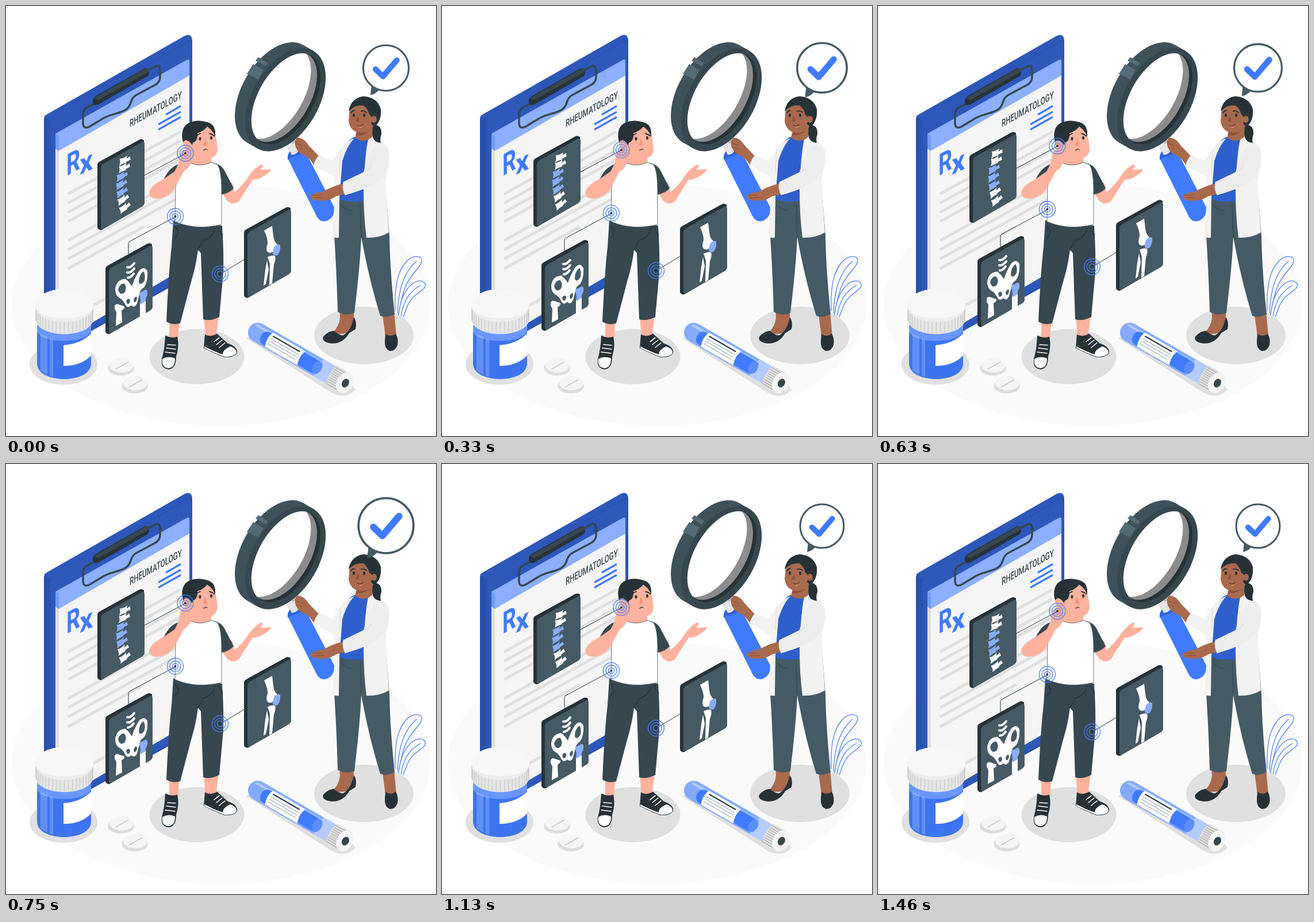
An HTML page for the animation above (1.5 s loop, 748 px wide and 748 px high).

```html
<!DOCTYPE html>
<html lang="en">
<head>
<meta charset="utf-8">
<title>Rheumatology</title>
<style>
html, body { margin: 0; width: 100%; height: 100%; overflow: hidden; background: #fff; }
svg { display: block; width: 100vw; height: 100vh; }
text { font-family: Roboto, "Open Sans", sans-serif; }
.line { fill: none; stroke-linecap: round; stroke-linejoin: round; }
.flat { stroke-linecap: butt; }
.dark { fill: #263238; }
.slate { fill: #37474f; }
.steel { fill: #455a64; }
.blue { fill: #407bff; }
.skin { fill: #ffb29d; }
.tan { fill: #a9694c; }
.coat { fill: #f2f2f2; }
.shade { fill: #e0e0e0; }
</style>
</head>
<body>
<svg viewBox="0 0 748 748">
  <ellipse cx="374" cy="520" rx="364" ry="210" fill="#fafafa"/>
  <g class="shade">
    <ellipse cx="622.5" cy="573" rx="86.5" ry="50"/>
    <ellipse cx="332" cy="610" rx="82.5" ry="48"/>
  </g>

  <g id="plant" class="line" stroke="#407bff" stroke-width="1.2">
    <path fill="#fff" d="M677 530C676 490 680 462 697 444C708 433 723 434 723 442C724 454 705 462 694 490Q687 510 683 537"/>
    <path fill="#fff" d="M683 537C686 510 694 490 712 480C723 475 731 481 729 488C726 496 708 501 699 520L691 541"/>
    <path d="M681 534C683 490 693 462 714 444M687 539C692 512 702 496 721 486"/>
  </g>

  <g id="board">
    <path fill="#2a51ac" d="M66 198Q66 191 72 188L311 52Q324 46 324 62L320 470L77 605L66 595Z"/>
    <path fill="#2d57b9" d="M77 208Q77 200 84 196L311 65Q324 57 324 70V464L77 605Z"/>
    <path fill="#2d57b9" d="M66 192L311 52Q320 48 323 56L77 201Z"/>
    <path fill="#e0e0e0" d="M86 222L92 226V590L86 585Z"/>
    <path fill="#f5f5f5" d="M92 226L319 94V451L92 585Z"/>
    <path fill="#8cb0ff" d="M86 222L314 94Q319 91 319 97V121L92 252L86 248Z"/>
    <path fill="#6f9bff" d="M86 222L92 226V252L86 248Z"/>
    <g id="rules" class="line flat" stroke="#e0e0e0" stroke-width="5"></g>
    <path class="line flat" stroke="#407bff" stroke-width="3.2" d="M278 189L304 174M265 206L304 184M265 215L304 193"/>
    <text transform="matrix(.645 -.36 0 1 215 211)" font-size="18" fill="#37474f" font-weight="500">RHEUMATOLOGY</text>
    <g class="blue" font-weight="700">
      <text transform="matrix(.72 -.4 0 1 105 296)" font-size="52">R</text>
      <text transform="matrix(1.02 -.48 0 1.1 128 294)" font-size="45">x</text>
    </g>
    <path class="line" stroke="#37474f" stroke-width="3.5" d="M152 171L140 177Q134 181 134 188V203Q134 215 145 210L165 198C180 187 195 189 209 180Q215 176 218 165Q221 157 230 153L260 137Q268 132 268 124V111Q267 101 258 106L247 112"/>
    <path class="dark" d="M151 168Q150 160 157 156L242 108Q249 107 249 117Q248 122 243 124L163 170Q154 176 151 168Z"/>
    <path class="slate" d="M153 160L244 108Q249 109 249 114L160 164Z"/>
  </g>

  <g id="bottle">
    <ellipse class="shade" cx="100" cy="623" rx="59" ry="36"/>
    <path fill="#3d74f0" d="M54 555H148V622C148 658 54 658 54 622Z"/>
    <path fill="#6a97ff" d="M54 555H148V566C140 588 62 588 54 566Z"/>
    <path fill="#fff" opacity=".2" d="M60 570L72 576V641L60 634ZM76 578L82 580V645L76 643Z"/>
    <path fill="#fff" d="M100 590Q130 588 148 570V608Q131 626 100 626Z"/>
    <path fill="#e6e6e6" d="M51 520H152V543C151 580 52 580 51 543Z"/>
    <path id="ribs" stroke="#cfcfcf" stroke-width="1.5" fill="none"/>
    <ellipse cx="101.5" cy="520" rx="50.5" ry="28" fill="#f7f7f7"/>
    <path fill="#ededed" d="M54 528Q60 548 101 550Q143 548 149 528Q138 543 101 543Q66 543 54 528Z"/>
  </g>

  <g id="pills"></g>

  <g id="tube">
    <path class="shade" d="M418 578L565 672Q590 686 608 668L590 640L440 568Z"/>
    <g transform="translate(438 568) rotate(30)">
      <rect x="-17" y="-17" width="176" height="34" rx="17" fill="#85abff"/>
      <path fill="#b4ccff" d="M122 -17H150V17H122Z"/>
      <path fill="#b4ccff" d="M-8 -12H140V-8H-10Z"/>
      <rect x="8" y="-11" width="118" height="25" rx="11" fill="#407bff"/>
      <ellipse cx="120" cy="1" rx="8" ry="12" fill="#5b8dff"/>
      <path fill="#fff" d="M23 -13H88Q82 0 88 15H23Q17 0 23 -13Z"/>
      <path fill="#37474f" d="M26 -9H80V-6.500H26Z"/>
      <path class="line" stroke="#9eabb2" stroke-width="1.2" d="M25 -2H80M25 3H80M25 8H80"/>
      <path fill="#dedede" d="M148 -19H176V19H148Q141 0 148 -19Z"/>
      <path id="grooves" stroke="#aaa" stroke-width="1" fill="none"/>
      <ellipse cx="175" cy="0" rx="14" ry="19" fill="#f5f5f5"/>
      <ellipse class="slate" cx="176" cy="0" rx="6" ry="8"/>
    </g>
  </g>

  <g id="man">
    <path class="skin" d="M284 542H302L299 580H284ZM344 538H370L365 577H347Z"/>
    <path class="dark" d="M277 573Q288 579 298 575Q302 592 296 610Q296 631 283 632Q269 631 271 614Q276 598 277 573Z"/>
    <path fill="#fff" d="M272 614Q282 608 294 613Q294 629 283 630Q270 629 272 614Z"/>
    <path class="dark" d="M346 571Q355 577 367 570L386 587Q404 593 402 604Q397 612 380 611Q366 606 344 595Z"/>
    <path fill="#fff" d="M345 592Q366 603 377 606Q377 598 390 592Q402 596 401 604Q396 611 380 610Q366 605 345 595Z"/>
    <path class="line" stroke="#fff" stroke-width="1.6" d="M281 589L295 590M279 595L295 597M277 602L294 604M362 584L371 577M366 589L376 581M371 594L381 586"/>
    <path class="slate" d="M291 373L376 382Q379 426 378 464L371 541Q355 549 343 545L339 430L334 424Q331 450 322 480L303 552Q290 556 279 549Q283 460 288 420Z"/>
    <path class="line" stroke="#263238" stroke-width="1.2" d="M364 386Q360 404 341 408M334 424L342 410M294 383Q306 396 292 404M377 398Q370 392 370 384"/>

    <path class="skin" d="M371 302L394 308L397 324Q412 312 421 298Q428 286 441 277Q449 274 446 280L442 285L462 284Q456 292 448 296Q438 303 429 302L405 340Q396 347 386 340Q375 328 371 302Z"/>
    <path class="line" stroke="#eb9481" stroke-width="1" d="M442 285L436 289M448 291L457 286"/>
    <path class="slate" d="M354 273Q372 272 380 286L396 317Q388 326 375 328Z"/>
    <path class="skin" d="M322 248L356 255L358 276Q336 286 320 276Z"/>
    <path class="slate" d="M308 273Q286 276 274 302Q282 308 297 309L310 282Z"/>
    <path fill="#fff" stroke="#455a64" stroke-width=".8" d="M321 273Q338 281 357 272L368 276Q375 287 375 320V380Q331 391 294 375L295 315Q300 289 310 278Z"/>

    <path class="skin" d="M322 212Q329 206 361 213Q367 231 368 250Q366 268 345 264Q326 260 319 247Z"/>
    <path class="dark" d="M307 233Q303 209 321 202Q334 197 350 202Q362 205 364 218V227Q359 215 350 210Q342 219 333 221Q334 235 325 238L322 249Q311 248 307 233Z"/>
    <path class="skin" d="M321 238Q312 229 308 238Q308 249 320 253L326 245Z"/>
    <path class="skin" d="M274 301Q252 312 249 324Q249 336 264 335Q285 334 296 312L309 288Q322 280 323 266Q325 254 320 249Q309 246 303 257Q302 274 293 288Z"/>
    <path fill="#f28f7c" d="M346 231L350 242L343 243Z"/>
    <g class="dark"><ellipse cx="337.5" cy="231" rx="2" ry="3"/><ellipse cx="357" cy="229.500" rx="2" ry="3"/></g>
    <path class="line" stroke="#263238" stroke-width="1.8" d="M331 226Q334 223 338 222M354 222Q359 223 362 226"/>
    <path class="line" stroke="#263238" stroke-width="1.3" d="M344 251Q347 248 350 250"/>
  </g>

  <g id="lens">
    <path class="line flat" stroke="#bdbdbd" stroke-width="18" d="M495 236L508 262"/>
    <path class="line flat" stroke="#e6e6e6" stroke-width="10" d="M492 238L505 264"/>
    <path class="blue" d="M490 265Q490 251 505 247Q515 244 520 252L571 350Q573 366 560 373Q548 378 541 367Z"/>
    <path fill="#3063d4" d="M490 265Q490 251 505 247Q515 244 519 250Q515 260 502 262Q493 263 490 268Z"/>
    <path fill="#e6e6e6" d="M490 244L504 237L510 250Q507 258 497 259Z"/>
    <g transform="rotate(30 486 163)" fill="#3f515a">
      <ellipse cx="465.5" cy="163" rx="58" ry="98"/>
      <rect x="465.500" y="65" width="20.500" height="196"/>
    </g>
    <path fill="#546a74" d="M419 118L439 128L448 111L430 101ZM434 95L452 105L456 99L439 89Z"/>
    <g transform="rotate(30 486 163)">
      <ellipse cx="486" cy="163" rx="58" ry="98" class="slate"/>
      <clipPath id="hole"><ellipse cx="486" cy="161" rx="48" ry="87"/></clipPath>
      <g clip-path="url(#hole)">
        <rect x="420" y="60" width="140" height="210" class="dark"/>
        <ellipse cx="480" cy="161" rx="47" ry="86" fill="#8c8c8c"/>
        <ellipse cx="468" cy="161" rx="46" ry="87" fill="#fff"/>
      </g>
    </g>
  </g>

  <g id="doctor">
    <path class="tan" d="M580 525H606L603 563Q590 574 568 569Q580 556 581 542ZM654 530H675L679 574Q669 582 660 574Z"/>
    <path class="dark" d="M552 575Q560 566 570 565Q578 572 586 573Q600 566 605 541Q611 549 608 562L597 569Q586 588 566 587Q548 584 552 575ZM660 570Q668 577 678 570Q683 579 681 590Q677 601 667 600Q658 596 659 582Z"/>
    <path class="steel" d="M580 334H662L667 400Q668 460 676 536Q663 543 651 539C636 490 626 445 618 402C616 450 610 500 606 534Q592 540 577 532Q575 460 571 400Z"/>
    <path class="line" stroke="#37474f" stroke-width="1.2" d="M618 402L616 346M584 346Q586 353 602 356"/>
    <path fill="#2f5fcc" d="M605 228L634 228L626 338Q604 344 579 336L583 253Q591 236 605 228Z"/>
    <path class="tan" d="M537 279Q527 262 517 259Q508 255 504 246Q500 234 507 229Q518 229 527 243L546 263Z"/>
    <path class="line" stroke="#8c503a" stroke-width="1" d="M505 238L516 243M505 245L515 248"/>
    <path class="coat" d="M606 230Q589 236 582 249L568 269L545 259Q538 266 535 277L571 298Q573 350 567 401Q572 404 579 403L580 334L585 270Q593 243 606 230Z"/>
    <path class="coat" d="M636 226Q663 234 667 254Q668 276 660 297L666 394Q649 404 627 403Q622 364 622 320Q624 260 630 232Z"/>
    <path class="line" stroke="#dadada" stroke-width="1" d="M582 249L580 288M660 297L658 302"/>
    <path class="tan" d="M590 308Q568 313 551 323Q537 324 529 331Q530 338 549 339Q566 338 574 331L591 327Z"/>
    <path class="line" stroke="#8c503a" stroke-width="1" d="M533 329L550 329M535 334L553 333"/>
    <path fill="#ededed" d="M640 246Q657 238 666 254Q669 282 653 300Q637 316 590 329Q584 318 587 306L622 289Q628 264 640 246Z"/>
    <path class="line" stroke="#d8d8d8" stroke-width="1" d="M622 289Q632 287 635 278M587 306Q584 318 590 329"/>

    <path class="dark" d="M637 207Q654 205 653 223Q650 231 652 238Q638 237 637 223Z"/>
    <path class="tan" d="M611 213L638 205L637 228Q623 240 607 229Z"/>
    <path fill="#8e513c" d="M611 216Q625 220 634 213Q628 226 609 225Z"/>
    <path class="tan" d="M598 176Q606 164 622 166L642 180V206Q630 224 612 220Q598 216 596 200Z"/>
    <path class="dark" d="M596 183Q600 160 622 157Q646 159 652 179Q654 199 641 211L635 205Q640 194 632 189Q630 179 622 173Q608 171 596 183Z"/>
    <ellipse class="tan" cx="640" cy="197" rx="5" ry="6"/>
    <path fill="#8e513c" d="M612 190L608 201L615 201Z"/>
    <g class="dark"><ellipse cx="605" cy="190" rx="2" ry="3"/><ellipse cx="623" cy="190" rx="2" ry="3"/></g>
    <path class="line" stroke="#263238" stroke-width="1.8" d="M600 186Q602 182 606 182M618 183Q622 181 627 185"/>
    <path class="line" stroke="#70352a" stroke-width="1.5" d="M611 207Q616 211 621 206"/>
    <path fill="#e48a7e" d="M613 209Q617 212 620 208Q620 212 616 212Z"/>
  </g>

  <g id="bubble">
    <path class="steel" d="M637 136L635 153Q643 152 650 144Z"/>
    <circle cx="661" cy="108" r="38" fill="#fff" stroke="#455a64" stroke-width="3"/>
    <path class="line" stroke="#407bff" stroke-width="9.5" d="M643.5 110L656 122L679 95"/>
  </g>

  <g id="scans">
    <g id="slabs"></g>
    <g id="spine"></g>
    <g id="pelvis" fill="#fff">
      <path class="line" stroke="#fff" stroke-width="4" d="M211 455Q217 456 223 448M211 464Q217 465 223 457M212 473Q217 473 222 466"/>
      <path d="M190 493Q192 476 208 475Q214 480 219 488Q223 475 231 462Q240 451 246 462Q247 480 240 490Q233 494 232 502L228 518Q223 527 218 521Q211 528 207 519Q203 511 197 508Q190 504 190 493Z"/>
      <path class="steel" d="M195 494Q197 484 205 483Q211 489 207 498Q199 506 195 494ZM231 481Q231 468 239 462Q243 467 241 478Q234 488 231 481ZM209 514Q212 507 216 512Q216 519 211 519ZM222 511Q225 504 228 507Q228 515 223 516Z"/>
      <path d="M189 527Q188 519 194 519L206 523Q207 527 201 530L202 551L191 557L192 533ZM233 517L243 511V539L233 545Z"/>
      <path fill="#8aaeff" d="M232 503Q232 497 238 497Q244 491 246 497Q247 504 243 509V514L233 520Q235 511 232 503Z"/>
    </g>
    <g id="knee" fill="#fff">
      <path d="M449 391L463 383L465 400Q466 411 472 415Q468 418 466 427Q458 433 454 427Q452 421 455 414Q456 406 449 391ZM455 437Q462 433 468 435Q470 441 466 450L463 483L458 486L459 449ZM454 443L457 459L452 484L448 487L451 460Z"/>
      <path fill="#8aaeff" d="M466 420Q472 413 477 416Q478 428 472 434Q463 436 464 429Z"/>
    </g>
    <path class="line" stroke="#263238" stroke-width="1" d="M241 295L312 257M213 435V413Q213 411 215 410L295 367M420 438L373 466.500"/>
    <g id="marks"></g>
  </g>
</svg>
<script>
const $ = id => document.getElementById(id);
const fill = (id, items, draw) => { $(id).innerHTML = items.map(draw).join(''); };

// Ruled text on the page
fill('rules', [[327, 303], [343, 303], [359, 303], [375, 303], [408, 303], [424, 303], [440, 303], [457, 240], [545, 180]],
  ([y, x]) => `<path d="M108 ${y}L${x} ${y - (x - 108) * .555}"/>`);

// Ribs of the bottle cap and the tube stopper
let ribs = '', grooves = '';
for (let i = 1; i < 22; i++) {
  const a = i * Math.PI / 22;
  ribs += `M${101.5 - 50 * Math.cos(a)} ${524 + 25 * Math.sin(a)}v20`;
}
for (let y = -15; y < 18; y += 4) grooves += `M147 ${y}H168`;
$('ribs').setAttribute('d', ribs);
$('grooves').setAttribute('d', grooves);

fill('pills', [[201, 625], [225, 656]], ([x, y]) => `<g transform="translate(${x} ${y})">
  <ellipse cx="-1" cy="5" rx="23" ry="13" fill="#e0e0e0"/>
  <path fill="#dcdcdc" d="M-21 0V6C-18 21 18 21 21 6V0Z"/>
  <ellipse rx="21" ry="12.5" fill="#f5f5f5"/>
  <path d="M-11 7L12 -6" stroke="#cfcfcf" stroke-width="2"/></g>`);

fill('slabs', [[159, 232], [173, 413], [414, 350]], ([x, y]) => `<g transform="translate(${x} ${y})">
  <path class="dark" d="M0 45Q0 41 4 39L73 1Q77 -1 81 2L82 110Q82 114 78 117L9 157Q5 160 1 156Q0 155 0 153Z"/>
  <path class="steel" d="M6 50Q6 46 10 43L76 6Q82 3 82 9V110Q82 114 78 117L10 156Q6 158 6 153Z"/></g>`);

fill('spine', [[204, 269], [203, 282], [199, 297], [198, 311], [199, 325], [201, 338], [204, 352]],
  ([x, y], i) => `<path transform="translate(${x} ${y}) skewY(-18) rotate(${9 - 3 * i})" fill="${i > 1 && i < 5 ? '#8aaeff' : '#fff'}"
    d="M-7 -4Q0 -3 6 -7L5 -2L11 -5L13 1L6 3V5Q0 5 -6 8Q-4 2 -7 -4Z"/>`);

fill('marks', [[312, 256.5], [294.5, 366.5], [372.5, 466.5]], ([x, y]) =>
  `<circle class="dark" cx="${x}" cy="${y}" r="2"/>` +
  [5, 9.5, 14].map(r => `<circle cx="${x}" cy="${y}" r="${r}" fill="none" stroke="#407bff" stroke-width="1.2"/>`).join(''));

const LOOP = 1500, FPS = 24, COUNT = 36, RISE = 14.96;
const BEAT = [[0, 1], [.1, 1.3], [.3, 1], [.4, 1], [.5, 1.3], [.6, 1], [1, 1]];

function ramp(steps, p) {
  const i = steps.findIndex(s => s[0] > p);
  const [a, u] = steps[i - 1], [b, v] = steps[i];
  return u + (v - u) * (p - a) / (b - a);
}

function draw(now) {
  const t = Math.max(0, now - start) % LOOP;
  const step = Math.floor((t + 2) * FPS / 1000) % COUNT;
  const p = (step + .5) / COUNT;
  const lift = RISE * (1 - Math.abs(1 - 2 * p));
  const s = ramp(BEAT, p);
  $('scans').setAttribute('transform', `translate(0 ${-lift})`);
  $('bubble').setAttribute('transform', `translate(661 111) scale(${s}) translate(-661 -111)`);
}

const start = performance.now();
draw(start);
requestAnimationFrame(function tick() {
  draw(performance.now());
  requestAnimationFrame(tick);
});
</script>
</body>
</html>
```
